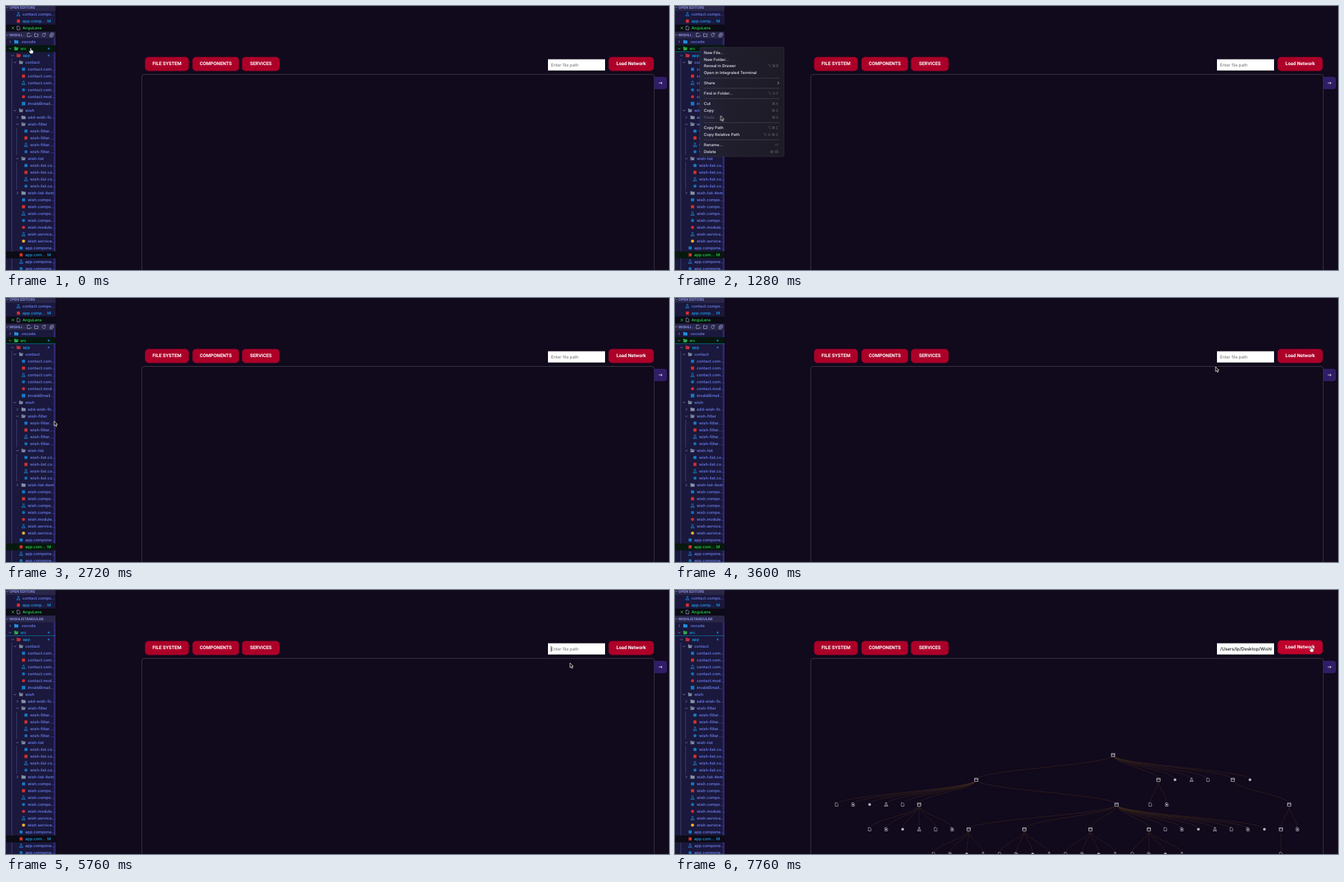
An HTML page that plays this animation: 964 by 384 pixels, repeating every 7840 ms.

```html
<!DOCTYPE html>
<html lang="en">
<head>
<meta charset="utf-8">
<title>File tree to network</title>
<style>
html, body { margin: 0; width: 100%; height: 100%; overflow: hidden; background: #11091c; }
svg { display: block; width: 964px; height: 384px; }
text { font: 500 5.8px Inter, sans-serif; fill: #7186f8; white-space: pre; text-rendering: geometricPrecision; }
.head { font-weight: 700; font-size: 5.1px; fill: #8a94e8; }
.green { fill: #27e04c; }
.cyan { fill: #1ea6f5; }
.btn { font: 700 6.9px Roboto, sans-serif; fill: #fff; text-anchor: middle; }
.hint { font-size: 6.1px; font-weight: 400; fill: #6a6a6a; }
.typed { font-size: 6.4px; fill: #111; }
.item { fill: #e6e6ee; }
.off { fill: #5c5a68; }
.hot { fill: #fff; }
.keys { font-family: Inter, "DejaVu Sans", sans-serif; font-size: 5.4px; letter-spacing: .6px; text-anchor: end; }
.line { fill: none; stroke-width: .7; }
.edge { fill: none; stroke: #6b4a1c; stroke-width: .6; stroke-dasharray: 2 .8; opacity: .7; }
#cursor { animation: move 7840ms ease-in-out infinite; }
@keyframes move {
  0%, 2.04% { transform: translate(36px, 61px); }
  8.16%, 10.2% { transform: translate(65px, 148px); }
  15.31% { transform: translate(66px, 158px); }
  20.41% { transform: translate(70px, 177px); }
  28.57%, 34.69% { transform: translate(70px, 179px); }
  44.9%, 46.94% { transform: translate(786px, 100px); }
  53.06%, 59.18% { transform: translate(808px, 83px); }
  68.37%, 74.49% { transform: translate(820px, 106px); }
  82.65%, 100% { transform: translate(925px, 82px); }
}
</style>
</head>
<body>
<svg id="stage" viewBox="0 0 964 384" xmlns="http://www.w3.org/2000/svg"></svg>
<script>
const LOOP = 7840;
const MENU_ON = 160, MENU_OFF = 2720, FIELD = 4320, PASTED = 5840, HOVER = 6400, LOADED = 7200;
let rules = "", count = 0;

const rect = (x, y, w, h, fill, more = "") =>
  `<rect x="${x}" y="${y}" width="${w}" height="${h}" fill="${fill}" ${more}/>`;
const text = (x, y, s, cls = "") => `<text x="${x}" y="${y + 2.1}" class="${cls}">${s}</text>`;
const line = (d, color, more = "") => `<path class="line" d="${d}" stroke="${color}" ${more}/>`;
const dot = (x, y, r, fill) => `<circle cx="${x}" cy="${y}" r="${r}" fill="${fill}"/>`;

// Group that is visible only between two times of the loop.
function shown(from, to, body) {
  const name = "show" + count++, pct = ms => (ms / LOOP * 100).toFixed(3) + "%";
  rules += `@keyframes ${name}{0%{opacity:${from ? 0 : 1}}` +
    (from ? `${pct(from)}{opacity:1}` : "") +
    (to < LOOP ? `${pct(to)}{opacity:0}` : "") + `100%{opacity:${to < LOOP ? 0 : 1}}}`;
  return `<g style="animation:${name} ${LOOP}ms step-end infinite">${body}</g>`;
}

const chevron = (x, y, open) => line(open
  ? `M${x - 1.8} ${y - .9}l1.8 1.8 1.8-1.8` : `M${x - .9} ${y - 1.8}l1.8 1.8-1.8 1.8`, "#8b90c4");

const folder = (x, y, color, open) =>
  `<path d="M${x - 3} ${y + 2.4}v-5h2.2l.8.9h3v${open ? 1 : 4.1}z" fill="${color}"/>` +
  (open ? `<path d="M${x - 3} ${y + 2.5}l1.2-3.3h5l-1.2 3.3z" fill="${color}" stroke="#1a183c" stroke-width=".4"/>` : "");

const flask = (x, y, color) =>
  line(`M${x - 1.3} ${y - 2.6}h2.6M${x - .8} ${y - 2.6}v2l-1.8 3.1h5.2l-1.8-3.1v-2M${x - 1.8} ${y + 1}h3.6`, color);

const icons = {
  css: (x, y) => rect(x - 2.2, y - 2.2, 4.4, 4.4, "#1679c8"),
  html: (x, y) => rect(x - 2.2, y - 2.3, 4.4, 4.6, "#d2322e"),
  spec: (x, y) => flask(x, y, "#1c84d4"),
  comp: (x, y) => dot(x, y, 2.3, "#1470b8"),
  mod: (x, y) => dot(x, y, 2.3, "#cc2f36"),
  serv: (x, y) => dot(x, y, 2.3, "#e8ae32"),
  ts: (x, y) => rect(x - 2.6, y - 2.6, 5.2, 5.2, "#1479c4"),
  doc: (x, y) => line(`M${x - 2} ${y - 2.7}h2.6l1.5 1.5v3.9h-4.1z`, "#a9adc8"),
  open: (x, y, c = "#8793ac") => folder(x, y, c, true),
  shut: (x, y, c = "#8793ac") => folder(x, y, c, false)
};

const files = (depth, label, kinds = "css html spec comp") => kinds.split(" ").map(k => [depth, k, label]);
const tree = [
  [0, "shut", ".vscode", "#1e8fe0"], [0, "open", "", "#2fbf4a"], [1, "open", "app", "#e0343c"],
  [2, "open", "contact"], ...files(3, "contact.com..."),
  [3, "mod", "contact.mod..."], [3, "ts", "invalidEmail..."],
  [2, "open", "wish"], [3, "shut", "add-wish-fo..."],
  [3, "open", "wish-filter"], ...files(4, "wish-filter...."),
  [3, "open", "wish-list"], ...files(4, "wish-list.co..."),
  [3, "shut", "wish-list-item"], ...files(3, "wish.compo..."),
  [3, "mod", "wish.module..."], [3, "spec", "wish.service..."], [3, "serv", "wish.service..."],
  [2, "css", "app.compone..."], [2, "html", ""], ...files(2, "app.compone...", "spec comp")
];

function treeRow([depth, kind, label, color], i) {
  const y = 52 + 10 * i, x = 21 + 3.5 * depth;
  const isFolder = kind === "open" || kind === "shut";
  return (isFolder ? chevron(x - 15, y, kind === "open") : "") +
    icons[kind](x - 6, y, color) + text(x, y, label, label === "app" ? "cyan" : "");
}

function sidebar() {
  const headerIcons = line("M31 39.5h3l1.5 1.5M31 39.5v5h4M34.5 43.5h3M41.5 40h2l1 1h3M41.5 40v4.5h5v-3", "#a9b0e0") +
    line("M57 40.6a2.4 2.4 0 1 0 .4 1.8M57.3 39v2h-2M64 41v4h4M65.3 39.5h3.7v3.7h-3.7zM66.2 41.4h1.9", "#a9b0e0");
  const modified = cls => text(28, 362, "app.com...", cls) + text(60, 362, "M", cls);
  return rect(0, 0, 72, 384, "#1a183c") + rect(69.3, 47, 2.7, 337, "#2f2870") +
    rect(0, 0, 72, 7, "#292648") + rect(0, 27, 72, 10, "#0c0b16") + rect(0, 37.5, 72, 9.5, "#292648") +
    chevron(2, 2, true) + text(5, 1.7, "OPEN EDITORS", "head") +
    icons.spec(18, 12) + text(24, 12, "contact.compo...") +
    icons.html(18, 22) + text(24, 22, "app.comp...", "cyan") + text(60, 22, "M", "cyan") +
    line("M8.2 30.2l3.6 3.6M11.8 30.2l-3.6 3.6", "#27e04c") + icons.doc(18, 32) + text(24, 32, "AnguLens", "green") +
    chevron(2, 42, true) +
    shown(0, FIELD, text(5, 42, "WISHLI...", "head") + headerIcons) +
    shown(FIELD, LOOP, text(5, 42, "WISHLISTANGULAR", "head")) +
    line("M8.5 77V384M15.5 177V217M15.5 227V267", "#4a4a78") +
    shown(0, FIELD, rect(0, 57, 72, 10, "#06170f") + text(21, 62, "src", "green")) +
    shown(FIELD, LOOP, text(21, 62, "src", "cyan")) +
    shown(MENU_ON, LOOP, line("M0 66.6H72", "#0b86b4")) +
    dot(62, 62, 1.4, "#1b74a8") + dot(62, 72, 1.4, "#2b62b8") +
    rect(0, 357, 72, 10, "#0c0b16") +
    shown(0, MENU_ON, modified("cyan")) +
    shown(MENU_ON, FIELD, rect(0, 357, 72, 10, "#07190f") + modified("green")) +
    shown(FIELD, LOOP, modified("cyan")) +
    tree.map(treeRow).join("");
}

const button = (x, w, label, fill = "#ad0029", y = 74) =>
  rect(x + .3, y + .3, w - .6, 20, fill, 'rx="5" stroke="#850828" stroke-width=".7"') +
  text(x + w / 2, y + 10.1, label, "btn");

function panel() {
  return button(202, 64, "FILE SYSTEM") + button(271, 68, "COMPONENTS") + button(343, 55, "SERVICES") +
    shown(0, HOVER, button(876, 66, "Load Network")) +
    shown(HOVER, LOOP, button(876, 66, "Load Network", "#be002c", 73)) +
    rect(788, 77.5, 83, 16.3, "#fff") +
    shown(0, PASTED, text(792.5, 85.7, "Enter file path", "hint")) +
    shown(FIELD, PASTED, rect(792.4, 81.5, .7, 8.5, "#111")) +
    shown(PASTED, LOOP, `<g clip-path="url(#field)">${text(792.8, 85.7, "/Users/lp/Desktop/Wishlist", "typed")}</g>`) +
    rect(197.5, 99.5, 745, 300, "none", 'rx="3.5" stroke="#3d3848" stroke-width=".9"') +
    `<path d="M942.5 103h14.5a4 4 0 0 1 4 4v10a4 4 0 0 1-4 4h-14.5z" fill="#2f1d66"/>` +
    line("M949 112h5M952.3 110.3l1.8 1.7-1.8 1.7", "#fff");
}

// Menus: each item is [centre y, label, keys, disabled].
const entry = ([y, label, keys = "", off], x, right, hot) =>
  text(x, y, label, hot ? "hot" : off ? "off" : "item") + text(right, y, keys, "keys " + (hot ? "hot" : "off"));

function contextMenu() {
  const items = [
    [67.5, "New File..."], [77.5, "New Folder..."], [87.3, "Reveal in Drawer", "⌥⌘R"],
    [97.3, "Open in Integrated Terminal"], [112.3, "Share"], [127.3, "Find in Folder...", "⌥⇧F"],
    [142.2, "Cut", "⌘X"], [152.2, "Copy", "⌘C"], [162, "Paste", "⌘V", true],
    [177.2, "Copy Path", "⌥⌘C"], [187, "Copy Relative Path", "⌥⇧⌘C"],
    [202, "Rename...", "⏎"], [212, "Delete", "⌘⌫"]
  ];
  const hot = (i, from, to) => shown(from, to,
    rect(38, items[i][0] - 5.2, 118, 10.2, "#1048b4", 'rx="1.5"') + entry(items[i], 42, 151, true));
  return shown(MENU_ON, MENU_OFF,
    rect(36, 60, 122.5, 159, "url(#glass)", 'rx="2.5" stroke="#3b3947" stroke-width=".5"') +
    [105, 119.7, 134.7, 169.7, 194.7].map(y => line(`M42 ${y}h110`, "#484653")).join("") +
    line("M149.2 110.2l1.9 2-1.9 2", "#d8d8e0") +
    items.map(i => entry(i, 42, 151)).join("") +
    hot(6, 560, 720) + hot(7, 720, 1280) + hot(9, 1440, MENU_OFF));
}

function editMenu() {
  const items = [[88.8, "Cut", "⌘X"], [98.8, "Copy", "⌘C"], [108.7, "Paste", "⌘V"]];
  const hot = (i, from, to) => shown(from, to,
    rect(810, items[i][0] - 5, 45.5, 10, "#1d5fd2", 'rx="1.5"') + entry(items[i], 814, 852, true));
  return shown(4400, 5680,
    rect(808.3, 81.8, 49, 33.7, "#2a2833", 'rx="2.5" stroke="#5a5864" stroke-width=".6"') +
    items.map(i => entry(i, 814, 852)).join("") +
    hot(0, 4480, 4960) + hot(1, 4960, 5120) + hot(2, 5120, 5680));
}

function network() {
  const series = (from, n, step = 24) => Array.from({ length: n }, (_, i) => from + step * i);
  // Each branch is [parent x, parent level, child xs].
  const branches = [
    [637, 0, [438, 703, 727, 751, 775, 811, 836]],
    [438, 1, [...series(235, 6), 642]], [703, 1, [691, 715]], [811, 1, [893]],
    [355, 2, series(283, 6)], [642, 2, [427, 508, 604, ...series(689, 8)]], [893, 2, [881, 905]],
    [427, 3, series(376, 4)], [508, 3, series(472, 4)], [604, 3, series(568, 4)],
    [689, 3, series(665, 4)], [881, 3, [881]]
  ];
  const level = n => 240 + 36 * n;
  const parents = new Set(branches.map(([x, n]) => x + "/" + n));
  const pale = "#b4b1bb";
  const page = (x, y) => line(`M${x - 2} ${y - 2.5}h2.6l1.4 1.4v3.6h-4z`, pale);
  const leaves = [
    page,
    (x, y) => page(x, y) + rect(x - 1, y - 1, 2, 2.2, pale),
    (x, y) => dot(x, y, 2, pale),
    (x, y) => flask(x, y, pale)
  ];
  const hub = (x, y) => line(`M${x - 2.5} ${y - 2.2}h5v4.6h-5zM${x - 2.5} ${y - .8}h5`, "#dddae2");
  const backing = (x, y) => rect(x - 3.2, y - 3.2, 6.4, 6.4, "#11091c");
  let edges = "", nodes = hub(637, 240);
  for (const [px, n, xs] of branches) {
    const y1 = level(n), y2 = level(n + 1), bend = (y2 - y1) * .4;
    xs.forEach((x, i) => {
      edges += `<path class="edge" d="M${px} ${y1}C${px} ${y1 + bend} ${x} ${y2 - bend} ${x} ${y2}"/>`;
      nodes += backing(x, y2) + (parents.has(x + "/" + (n + 1)) ? hub : leaves[i % 4])(x, y2);
    });
  }
  return shown(LOADED, LOOP, edges + nodes);
}

function cursor() {
  const edge = 'stroke="#fff" stroke-width=".7" stroke-linejoin="round"';
  const arrow = `<path d="M0 0v7l1.6-1.4 1.1 2.4 1.2-.5-1.1-2.4h2.1z" fill="#111" ${edge}/>`;
  const hand = `<path d="M-.8.7q.8-1.2 1.5 0v2.4l2.5.7q.7.3.5 1.2l-.6 3.2h-3.6l-2.3-3.2q.2-1 1.2-.5l.8.7z" fill="#fff" stroke="#222" stroke-width=".4"/>`;
  const beam = "M-1.6-3.5q1.6 0 1.6 1v5q0 1 1.6 1M1.6-3.5q-1.6 0-1.6 1v5q0 1-1.6 1";
  return `<g id="cursor">` + shown(0, 1280, hand) + shown(1280, 4160, arrow) +
    shown(4160, 4800, line(beam, "#fff", 'style="stroke-width:1.4"') + line(beam, "#111")) +
    shown(4800, HOVER, arrow) + shown(HOVER, LOOP, hand) + `</g>`;
}

const defs = `<defs>
  <linearGradient id="glass"><stop offset="0" stop-color="#22223a"/><stop offset=".35" stop-color="#201e2c"/><stop offset="1" stop-color="#1d1b25"/></linearGradient>
  <clipPath id="side"><rect width="72" height="384"/></clipPath>
  <clipPath id="field"><rect x="791" y="78" width="77" height="16"/></clipPath></defs>`;

document.getElementById("stage").innerHTML = defs + rect(0, 0, 964, 384, "#11091c") +
  `<g clip-path="url(#side)">${sidebar()}</g>` +
  panel() + network() + contextMenu() + editMenu() + cursor();
document.head.appendChild(document.createElement("style")).textContent = rules;
</script>
</body>
</html>
```
